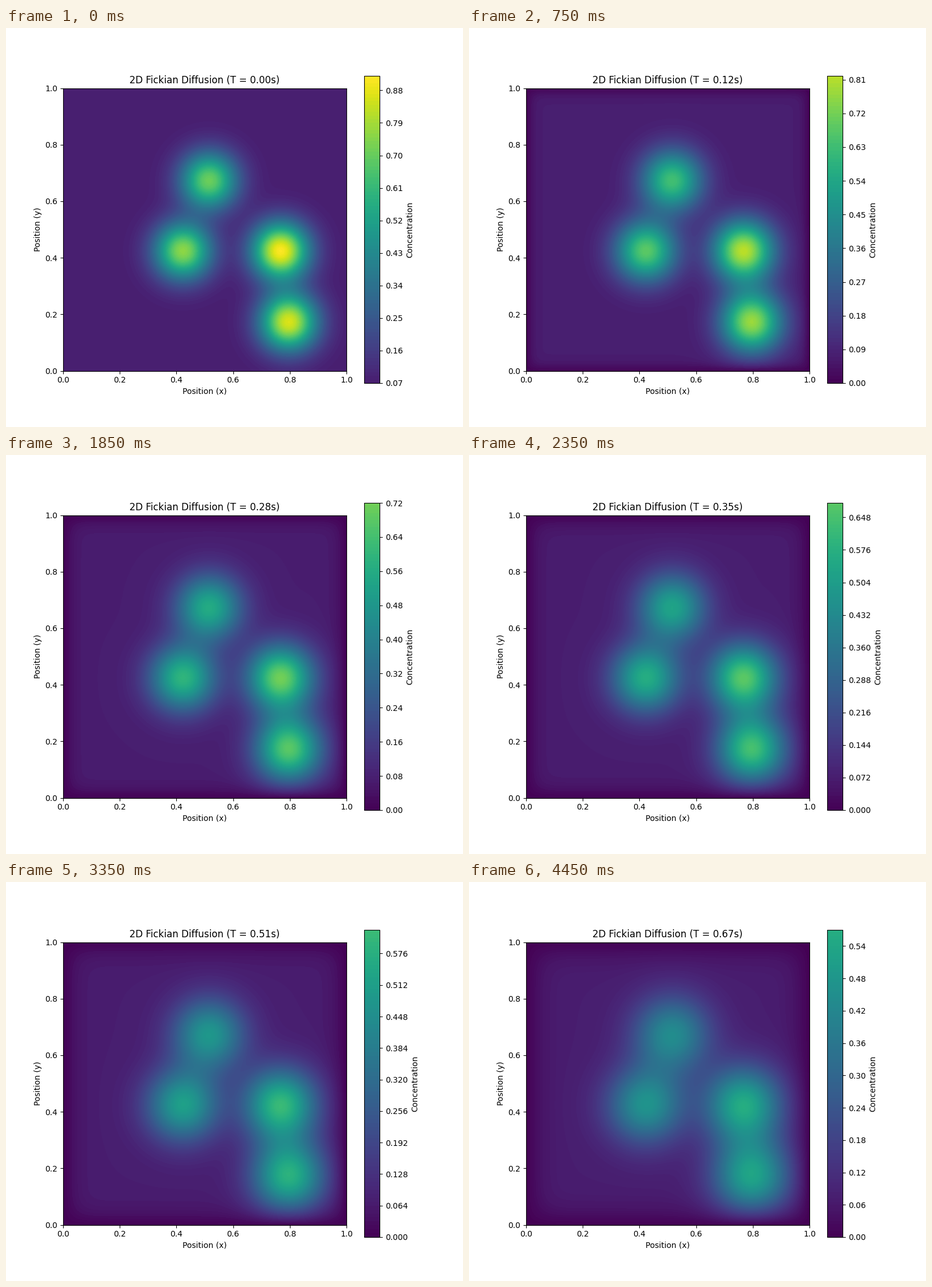
Recreate the animation shown at these times as a matplotlib script. Size 800x700 px, loop 4500 ms.

```python
import numpy as np
import matplotlib.pyplot as plt
from matplotlib.animation import FuncAnimation

N, FRAMES, INTERVAL = 100, 90, 50
D, DT, SUBSTEPS = 0.0028, 0.0025, 3
BASE, VAR = 0.0716, 0.005
HELD = {44, 46, 56, 58}  # ticks that repeat the previous picture
BLOBS = [  # x, y, amplitude
    (0.515, 0.673, 0.635),
    (0.423, 0.424, 0.685),
    (76 / 99, 42 / 99, 0.841),
    (0.796, 0.173, 0.79),
]

axis = np.linspace(0, 1, N)
X, Y = np.meshgrid(axis, axis)
RATE = D * DT / (axis[1] - axis[0]) ** 2


def start_field():
    c = np.full((N, N), BASE)
    for x, y, amp in BLOBS:
        c += amp * np.exp(-((X - x) ** 2 + (Y - y) ** 2) / (2 * VAR))
    return c


def step(c):
    """One explicit diffusion step with zero concentration on the walls."""
    new = np.zeros_like(c)
    mid = c[1:-1, 1:-1]
    new[1:-1, 1:-1] = mid + RATE * (
        c[2:, 1:-1] + c[:-2, 1:-1] + c[1:-1, 2:] + c[1:-1, :-2] - 4 * mid
    )
    return new


def solve():
    fields = [start_field()]
    c = step(fields[0])
    for _ in range(FRAMES - 1):
        for _ in range(SUBSTEPS):
            c = step(c)
        fields.append(c)
    return fields


fields = solve()
vmax = fields[0].max()

fig = plt.figure(figsize=(8, 7), dpi=100)
ax = fig.add_axes([0.125, 0.11, 0.62, 0.77])
ax.set(xlim=(0, 1), ylim=(0, 1), aspect="equal",
       xlabel="Position (x)", ylabel="Position (y)")
drawn = []


def update(i):
    k = i - 1 if i in HELD else i
    while drawn:
        drawn.pop().remove()
    cs = ax.contourf(X, Y, fields[k], levels=100, cmap="viridis",
                     vmin=0, vmax=vmax)
    cax = fig.add_axes([0.78375, 0.11, 0.0336875, 0.77])
    fig.colorbar(cs, cax=cax, label="Concentration")
    drawn.extend([cs, cax])
    t = (SUBSTEPS * k + 1) * DT
    ax.set_title(f"2D Fickian Diffusion (T = {t:.2f}s)")
    return []


anim = FuncAnimation(fig, update, frames=FRAMES, interval=INTERVAL,
                     repeat=True, repeat_delay=0, blit=False)
plt.show()
```
